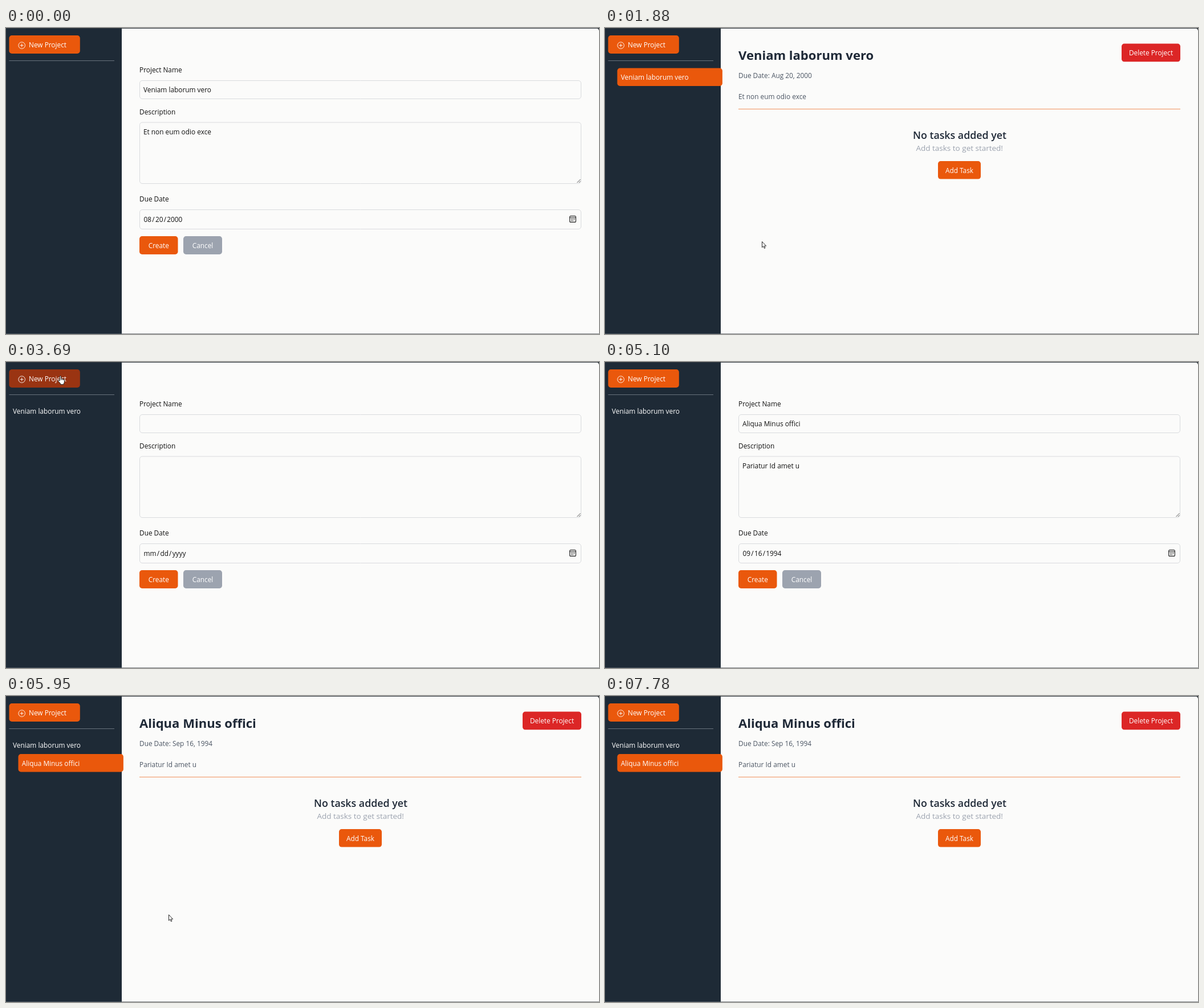
Write an HTML page with a canvas that moves like this. It is 1040 px wide and 538 px high and loops after 8000 ms.

```html
<!DOCTYPE html>
<html lang="en">
<head>
<meta charset="utf-8">
<title>Project manager</title>
<style>
  html, body { margin: 0; width: 100%; height: 100%; overflow: hidden; background: #fbfbfa; }
  canvas { display: block; }
</style>
</head>
<body>
<canvas id="stage" width="1040" height="538"></canvas>
<script>
const ctx = document.getElementById('stage').getContext('2d');
const LOOP = 8000;
const ORANGE = '#ea580c', RUST = '#9a3412', SLATE = '#1e2a36', GRAY = '#9ca3af', BORDER = '#d9dbde';
const SIZE = 11.85;

const projects = [
  { name: 'Veniam laborum vero', text: 'Et non eum odio exce', field: '08/20/2000', due: 'Aug 20, 2000' },
  { name: 'Aliqua Minus offici', text: 'Pariatur Id amet u', field: '09/16/1994', due: 'Sep 16, 1994' }
];
const blank = { name: '', text: '', field: 'mm/dd/yyyy' };

const arrow = (x, y) => ({ shape: drawArrow, x, y });
const hand = (x, y) => ({ shape: drawHand, x, y });

// Each step changes part of the state; everything else carries over.
const start = {
  page: 'form', form: projects[0], count: 0, active: -1, hover: -1, slide: 0,
  newBg: ORANGE, createBg: ORANGE, cancelBg: GRAY, cursor: null, mark: false
};
const steps = [
  [550, { cursor: arrow(693, 30) }],
  [700, { cursor: arrow(443, 202) }],
  [830, { cursor: arrow(405, 280) }],
  [980, { cursor: arrow(289, 343) }],
  [1130, { cursor: hand(270, 367) }],
  [1280, { cursor: hand(271, 375), createBg: '#b5400f' }],
  [1410, { createBg: RUST }],
  [1730, { cursor: arrow(275, 375) }],
  [1880, { page: 'project', count: 1, active: 0, createBg: ORANGE }],
  [2030, { cursor: arrow(246, 312) }],
  [2150, { cursor: arrow(188, 190) }],
  [2270, { cursor: arrow(132, 84) }],
  [2390, { cursor: arrow(107, 41) }],
  [2540, { cursor: hand(91, 24), newBg: RUST }],
  [3690, { page: 'form', form: blank, active: -1 }],
  [3840, { cursor: hand(92, 25) }],
  [3990, { cursor: arrow(632, 70), newBg: ORANGE }],
  [4140, { cursor: arrow(683, -3) }],
  [4280, { cursor: null }],
  [5100, { form: projects[1] }],
  [5230, { cursor: arrow(751, 7) }],
  [5380, { cursor: arrow(351, 350) }],
  [5530, { cursor: hand(326, 371), cancelBg: '#838b97' }],
  [5650, { cursor: hand(281, 384), cancelBg: GRAY, createBg: RUST }],
  [5950, { page: 'project', count: 2, active: 1, cursor: arrow(285, 384), createBg: ORANGE }],
  [6230, { cursor: arrow(252, 304) }],
  [6380, { cursor: arrow(135, 131) }],
  [6530, { cursor: hand(98, 87), hover: 0, slide: 1 }],
  [6960, { active: 0, hover: -1, slide: 0 }],
  [7510, { cursor: hand(97, 111), hover: 1, slide: 0.6 }],
  [7630, { slide: 1 }],
  [7780, { active: 1, hover: -1, slide: 0, cursor: null, mark: true }]
];

function stateAt(t) {
  const state = { ...start };
  for (const [time, change] of steps) if (t >= time) Object.assign(state, change);
  return state;
}

function text(str, x, y, color, { size = SIZE, weight = 400, align = 'left' } = {}) {
  ctx.font = `${weight} ${size}px "Open Sans", "Noto Sans", sans-serif`;
  ctx.textAlign = align;
  ctx.fillStyle = color;
  ctx.fillText(str, x, y);
}

function rect(x, y, w, h, color) {
  ctx.fillStyle = color;
  ctx.fillRect(x, y, w, h);
}

function round(x, y, w, h, r) {
  ctx.beginPath();
  ctx.roundRect(x, y, w, h, r);
}

function button(label, x, y, w, h, color) {
  round(x, y, w, h, 4.7);
  ctx.fillStyle = color;
  ctx.fill();
  if (label) text(label, x + w / 2, y + h / 2 + 4.8, '#fff', { align: 'center' });
}

function field(y, h) {
  round(234.5, y, 774, h, 4.5);
  ctx.strokeStyle = BORDER;
  ctx.lineWidth = 1;
  ctx.stroke();
}

function lines(points, color, width = 1) {
  ctx.beginPath();
  for (const [x1, y1, x2, y2] of points) {
    ctx.moveTo(x1, y1);
    ctx.lineTo(x2, y2);
  }
  ctx.strokeStyle = color;
  ctx.lineWidth = width;
  ctx.stroke();
}

function dateValue(value) {
  let x = 241.6;
  for (const part of value.split(/(\/)/)) {
    text(part, x, 341, '#111');
    x += ctx.measureText(part).width + 1.2;
  }
}

function calendar() {
  round(988.6, 330.6, 10.8, 10.8, 2);
  ctx.strokeStyle = '#222';
  ctx.lineWidth = 1.1;
  ctx.stroke();
  lines([[989, 333.6, 999, 333.6]], '#222');
  for (let i = 0; i < 5; i++) rect(990.8 + (i % 3) * 2.6, 335.4 + (i > 2) * 2.5, 1.4, 1.4, '#222');
}

function drawForm({ form, createBg, cancelBg }) {
  text('Project Name', 234, 78, '#111');
  text('Description', 234, 151.5, '#111');
  text('Due Date', 234, 305, '#111');
  field(92.5, 32);
  field(166, 107.5);
  field(319.5, 34);
  lines([[1001.5, 272, 1007.5, 266], [1004.8, 272, 1007.5, 269.3]], '#555');
  text(form.name, 241, 113, '#111');
  text(form.text, 241, 187, '#111');
  dateValue(form.field);
  calendar();
  button('Create', 234, 366, 67.5, 32, createBg);
  button('Cancel', 311, 366, 68, 32, cancelBg);
}

function drawProject({ active }) {
  const project = projects[active];
  text(project.name, 234, 56, '#1f2937', { size: 22.05, weight: 700 });
  text('Due Date: ' + project.due, 234, 87.5, '#4b5563');
  text(project.text, 234, 125, '#4b5563');
  rect(234, 142, 775, 1, '#f0905a');
  button('Delete Project', 906, 27.5, 103, 31.8, '#dc2626');
  text('No tasks added yet', 622, 194.5, '#1f2937', { size: 17.8, weight: 600, align: 'center' });
  text('Add tasks to get started!', 621.7, 216, GRAY, { size: 13.5, align: 'center' });
  button('Add Task', 584, 234, 75, 31.6, ORANGE);
}

function drawSidebar({ newBg, count, active, hover, slide, mark }) {
  button('', 5.5, 13, 124.3, 32, newBg);
  ctx.beginPath();
  ctx.arc(27.7, 30.6, 5.8, 0, Math.PI * 2);
  ctx.strokeStyle = '#fff';
  ctx.lineWidth = 0.9;
  ctx.stroke();
  lines([[24.7, 30.6, 30.7, 30.6], [27.7, 27.6, 27.7, 33.6]], '#fff', 0.9);
  text('New Project', 40, 34, '#fff');
  rect(5.5, 57, 184.5, 1, '#68727d');

  for (let i = 0; i < count; i++) {
    const shift = i === active ? 1 : i === hover ? slide : 0;
    const x = 5.8 + 15.7 * shift, y = 70.5 + 31.5 * i;
    ctx.globalAlpha = shift;
    button('', x, y, 184.4, 31.5, ORANGE);
    ctx.globalAlpha = 1;
    text(projects[i].name, x + 6.2, y + 20.6, '#fff');
  }
  if (mark) rect(102, 117, 1, 6, '#a9806a');
}

function outline(path) {
  ctx.fillStyle = '#fff';
  ctx.strokeStyle = '#111';
  ctx.lineWidth = 0.9;
  ctx.lineJoin = 'round';
  ctx.fill(path);
  ctx.stroke(path);
}

function drawArrow() {
  outline(new Path2D('M.5 .6V10.8L2.8 8.7L4.4 12.4L6 11.7L4.4 8.2H7.6Z'));
}

function drawHand() {
  outline(new Path2D('M3.2 9V1.7Q3.2 .5 4.3 .5T5.4 1.7V5.5Q6.5 4.8 7.4 5.9Q8.6 5.3 9.4 6.5' +
    'Q11.4 6.2 11.4 8.2V11.2Q11.3 12.7 10.3 13.6V15.4H4.5V14Q2.6 12.1 .8 9.3Q.3 7.7 1.7 7.7Q2.6 8 3.2 9Z'));
  lines([[5.4, 5.5, 5.4, 8], [7.4, 5.9, 7.4, 8], [9.4, 6.5, 9.4, 8.2]], '#111', 0.7);
}

function drawWindow() {
  rect(0, 0, 1040, 538, '#fbfbfa');
  rect(0, 0, 203, 538, SLATE);
}

function drawFrame() {
  rect(0, 0, 1040, 1, '#30373d');
  rect(203, 537, 837, 1, '#85898c');
  rect(0, 537, 203, 1, '#46505a');
  ctx.beginPath();
  ctx.moveTo(1035, 0);
  ctx.lineTo(1040, 0);
  ctx.lineTo(1040, 5);
  ctx.quadraticCurveTo(1039.5, 1, 1035, 0);
  ctx.fillStyle = '#30373d';
  ctx.fill();
}

function draw(now) {
  const state = stateAt(now % LOOP);
  drawWindow();
  (state.page === 'form' ? drawForm : drawProject)(state);
  drawSidebar(state);
  drawFrame();
  if (state.cursor) {
    const { shape, x, y } = state.cursor;
    ctx.save();
    ctx.translate(x, y);
    shape();
    ctx.restore();
  }
}

const begin = performance.now();
function tick() {
  draw(performance.now() - begin);
  requestAnimationFrame(tick);
}
tick();
</script>
</body>
</html>
```
